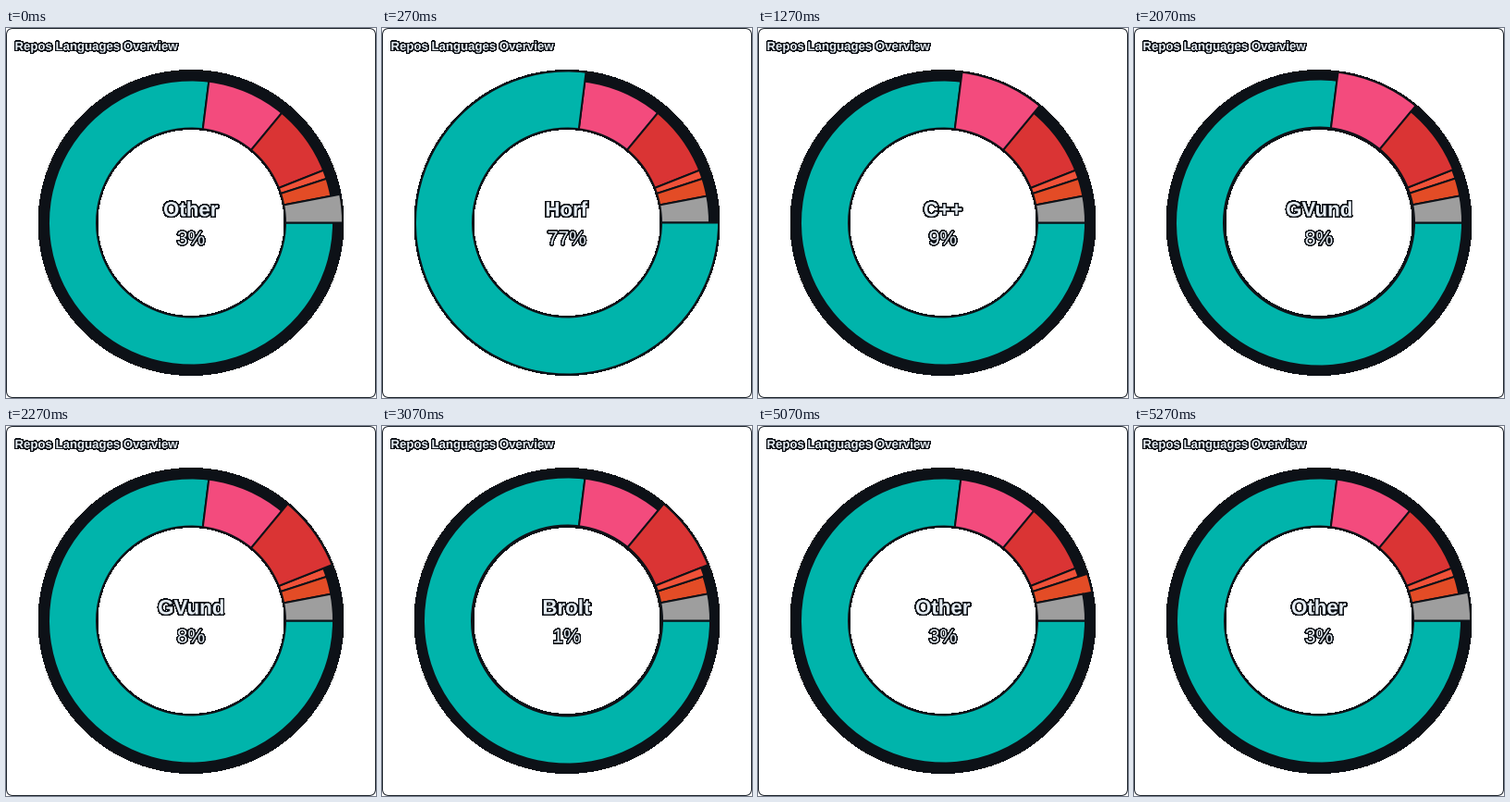
A matplotlib script for the animation above (5990 ms loop, 400 by 400 pixels).

```python
import matplotlib.pyplot as plt
from matplotlib.animation import FuncAnimation
from matplotlib.patches import FancyBboxPatch, PathPatch, Wedge
from matplotlib.textpath import TextPath

SIZE, DPI = 400, 100
PX = 72 / DPI
LOOP, TICK = 5990, 10
DARK, LIGHT = "#0d1117", "#e6edf3"
CENTER = (200, 189.5)
RIM, THIN, THICK = 164, 52, 62

# name, percent, colour
SLICES = [
    ("Horf", 77, "#00b4ab"),
    ("C++", 9, "#f34b7d"),
    ("GVund", 8, "#da3434"),
    ("Brolt", 1, "#f05138"),
    ("HTML", 2, "#e34c26"),
    ("Other", 3, "#9e9e9e"),
]
STEPS = (70, 130, 200, 270)          # ms within each second
HEAD_START = (0, 0, 0.1, 0.1, 0, 0)  # progress at the first step
PER_STEP = 0.43

fig = plt.figure(figsize=(SIZE / DPI, SIZE / DPI), dpi=DPI, facecolor="white")
ax = fig.add_axes([0, 0, 1, 1])
ax.set(xlim=(0, SIZE), ylim=(0, SIZE))
ax.axis("off")


def text_path(text, x, y, size, weight="bold", centered=True):
    font = {"family": "Liberation Sans", "weight": weight}
    if centered:
        box = TextPath((0, 0), text, size=size, prop=font).get_extents()
        x -= (box.x0 + box.x1) / 2
    return TextPath((x, y), text, size=size, prop=font)


def add_label(path, halo_width):
    """Light text over a hard-edged dark halo."""
    halo = PathPatch(path, fc=DARK, ec=DARK, lw=halo_width * PX,
                     joinstyle="round", antialiased=False, snap=False, zorder=5)
    fill = PathPatch(path, fc=LIGHT, lw=0, snap=False, zorder=6)
    for patch in (halo, fill):
        ax.add_patch(patch)
    return halo, fill


ax.add_patch(FancyBboxPatch(
    (0.5, 0.5), SIZE - 1, SIZE - 1, boxstyle="round,pad=0,rounding_size=7",
    fc="white", ec="#1c232b", lw=PX, snap=False))
ax.add_patch(Wedge(CENTER, RIM + 1, 0, 360, width=THICK + 2, fc=DARK, lw=0,
                   antialiased=False))

# Slices run clockwise from three o'clock, so the last one ends at zero degrees.
wedges = []
angle = 360
for _, share, color in SLICES:
    sweep = share * 3.6
    start = (angle - sweep) if wedges else 360 - sweep
    wedges.append(ax.add_patch(Wedge(
        CENTER, RIM, start, angle, width=THIN, fc=color, ec=DARK,
        lw=2 * PX, joinstyle="miter")))
    angle = start

name_paths = [text_path(name, 200, 196.5, 22.3) for name, _, _ in SLICES]
share_paths = [text_path(f"{share}%", 200, 165.8, 21, "normal")
               for _, share, _ in SLICES]
add_label(text_path("Repos Languages Overview", 9.5, 376, 13.2, centered=False), 2)
name_label = add_label(name_paths[-1], 2.2)
share_label = add_label(share_paths[-1], 1.8)


def progress(ms):
    """Index of the selected slice and how far its growth has come."""
    second, rest = divmod(ms, 1000)
    done = sum(rest >= step for step in STEPS)
    if done == 0:
        return (second - 1) % len(SLICES), 1.0
    if done == len(STEPS):
        return second, 1.0
    return second, HEAD_START[second] + PER_STEP * (done - 1)


def draw(frame):
    current, t = progress(frame * TICK)
    depth = [THIN] * len(SLICES)
    depth[current - 1] = THICK + (THIN - THICK) * t
    depth[current] = THIN + (THICK - THIN) * t

    # The deepest slice always touches the rim, so the hole breathes.
    hole = RIM - max(depth)
    for wedge, d in zip(wedges, depth):
        wedge.set_radius(hole + d)
        wedge.set_width(d)
        wedge.set_zorder(3)
    wedges[current].set_zorder(4)

    for label, paths in ((name_label, name_paths), (share_label, share_paths)):
        for patch in label:
            patch.set_path(paths[current])
    return [*wedges, *name_label, *share_label]


anim = FuncAnimation(fig, draw, frames=LOOP // TICK, interval=TICK,
                     init_func=lambda: draw(0), repeat=True, repeat_delay=0,
                     blit=False)
plt.show()
```
